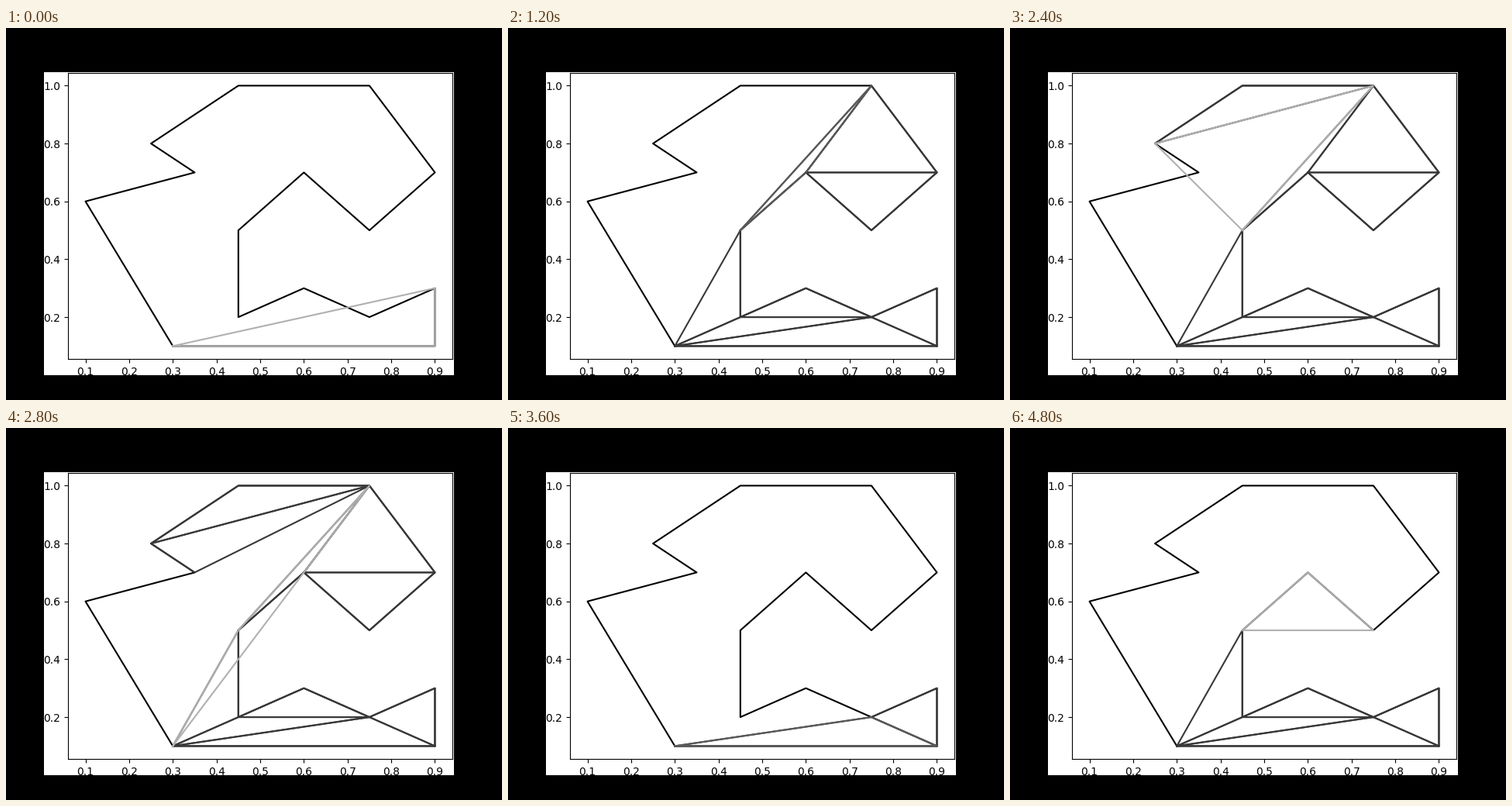
A matplotlib script for the animation above (5000 ms loop, 640x480 px).

```python
import matplotlib.pyplot as plt
from matplotlib.animation import FuncAnimation
from matplotlib.patches import Rectangle

POLYGON = [(0.3, 0.1), (0.9, 0.1), (0.9, 0.3), (0.75, 0.2), (0.6, 0.3),
           (0.45, 0.2), (0.45, 0.5), (0.6, 0.7), (0.75, 0.5), (0.9, 0.7),
           (0.75, 1.0), (0.45, 1.0), (0.25, 0.8), (0.35, 0.7), (0.1, 0.6)]
REJECTED, ACCEPTED, DONE, FINAL = "0.69", "0.35", "0.22", "black"
EPS = 1e-9


def cross(o, a, b):
    return (a[0] - o[0]) * (b[1] - o[1]) - (a[1] - o[1]) * (b[0] - o[0])


def contains(triangle, p):
    """True if p lies in the triangle or on its border."""
    a, b, c = triangle
    return min(cross(a, b, p), cross(b, c, p), cross(c, a, p)) >= -EPS


def is_ear(triangle, corners):
    a, b, c = triangle
    if cross(a, b, c) <= EPS or a[0] == c[0]:  # reflex corner or vertical cut
        return False
    return not any(contains(triangle, p) for p in corners if p not in triangle)


def clip_ears(polygon):
    """Yield each tested triangle, whether it is an ear, and the ears so far."""
    corners, ears, i = list(polygon), [], 1
    while len(corners) > 2:
        triangle = corners[i - 1:i + 2]
        ear = is_ear(triangle, corners)
        if ear:
            ears.append(triangle)
            del corners[i]
            i = 1
        else:
            i += 1
        yield triangle, ear, list(ears)


def closed(points):
    return tuple(zip(*points, points[0]))


STEPS = list(clip_ears(POLYGON))
# Steps play in the text order of their numbers: 1, 10, 11, ... 19, 2, 20, ...
ORDER = sorted(range(1, len(STEPS) + 1), key=str)

fig, ax = plt.subplots(figsize=(6.4, 4.8), dpi=100, facecolor="black")
fig.add_artist(Rectangle((49, 32), 529, 391, transform=None, facecolor="white",
                         edgecolor="none", antialiased=False, zorder=-1))

ax.plot(*closed(POLYGON), color="black", lw=1.5)
ax.set_xlim(0.06, 0.94)
ax.set_ylim(0.055, 1.045)

ear_lines = [ax.plot([], [], lw=1.5)[0] for _ in POLYGON[2:]]
test_line, = ax.plot([], [], lw=1.5)


def update(frame):
    step = ORDER[frame]
    last = step == len(STEPS)
    triangle, ear, ears = STEPS[step - 1]

    for i, line in enumerate(ear_lines):
        line.set_data(*(closed(ears[i]) if i < len(ears) else ([], [])))
        line.set_color(FINAL if last else DONE)

    test_line.set_data(*closed(triangle))
    test_line.set_color(ACCEPTED if ear else REJECTED)
    test_line.set_visible(not last)
    return [*ear_lines, test_line]


anim = FuncAnimation(fig, update, frames=len(ORDER), interval=200,
                     repeat=True, repeat_delay=0, blit=False)
plt.show()
```
